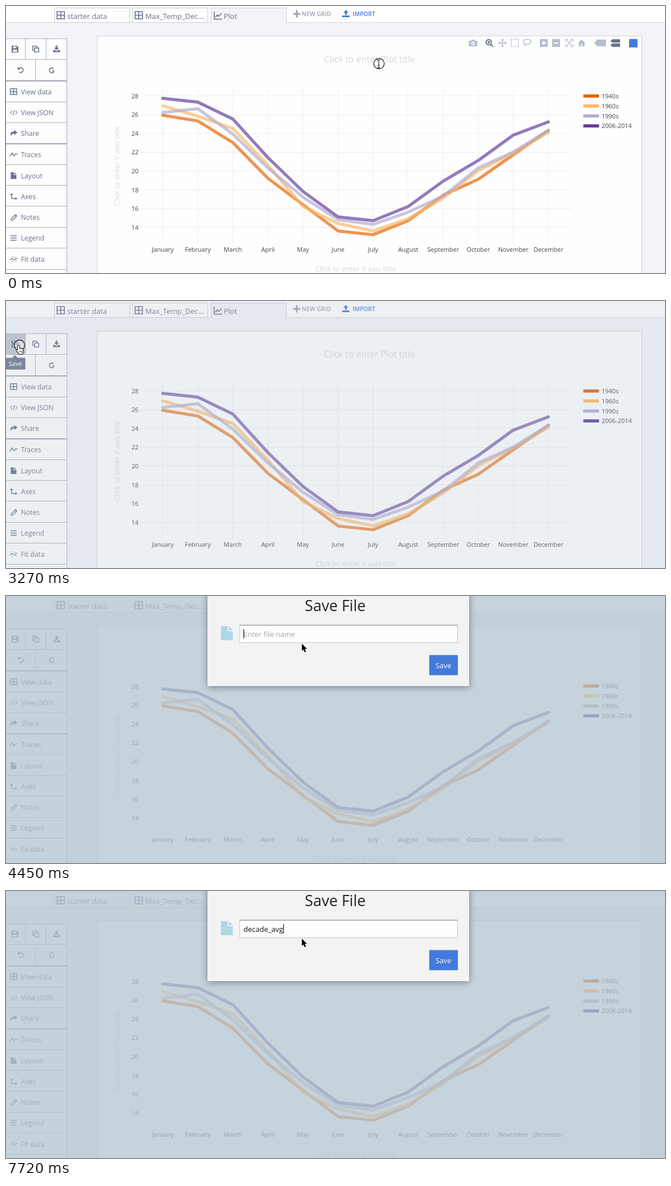
Recreate the animation shown at these times as an HTML page with a canvas. Size 1174x477 px, loop 8000 ms.

```html
<!DOCTYPE html>
<html lang="en">
<head>
<meta charset="utf-8">
<title>Saving a plot</title>
<style>
html, body { margin: 0; width: 100%; height: 100%; overflow: hidden; background: #f3f3f8; }
canvas { display: block; }
</style>
</head>
<body>
<canvas id="stage" width="1174" height="477"></canvas>
<script>
const ctx = document.getElementById('stage').getContext('2d');
const W = 1174, H = 477, LOOP = 8000;
const FONT = '"Open Sans", "Noto Sans", sans-serif';
const SLATE = '#69738a', PALE = '#b7bfcf', BLUE = '#447adb', EDGE = '#a9aebc';

// ---------- helpers ----------
function rect(x, y, w, h, fill) {
  ctx.fillStyle = fill;
  ctx.fillRect(x, y, w, h);
}

function frame(x, y, w, h, fill, stroke) {
  rect(x, y, w, h, fill);
  ctx.strokeStyle = stroke;
  ctx.lineWidth = 1;
  ctx.strokeRect(x + .5, y + .5, w - 1, h - 1);
}

function text(s, x, y, size, color, align = 'left', weight = 400) {
  ctx.font = `${weight} ${size}px ${FONT}`;
  ctx.textAlign = align;
  ctx.fillStyle = color;
  ctx.fillText(s, x, y);
}

function shape(d, x, y, { fill, stroke, width = 1.5, dash = [] }) {
  const path = new Path2D(d);
  ctx.save();
  ctx.translate(x, y);
  ctx.lineJoin = 'round';
  ctx.setLineDash(dash);
  if (stroke) {
    ctx.strokeStyle = stroke;
    ctx.lineWidth = width;
    ctx.stroke(path);
  }
  if (fill) {
    ctx.fillStyle = fill;
    ctx.fill(path, 'evenodd');
  }
  ctx.restore();
}

const solid = (d, x, y, color) => shape(d, x, y, { fill: color });
const line = (d, x, y, color, width, dash) => shape(d, x, y, { stroke: color, width, dash });
const passed = (t, times) => times.filter(v => t >= v).length;
const smooth = p => p * p * (3 - 2 * p);
const easeOut = p => 1 - Math.pow(1 - p, 2.2);

// ---------- page ----------
const GRID = 'M1 1H14V14H1ZM7.5 1V14M1 7.5H14';

function drawTabs() {
  rect(0, 0, W, 29, '#fff');
  rect(0, 29, W, 1, '#d3d4da');
  [[86, 'starter data'], [225, 'Max_Temp_Dec...']].forEach(([x, label]) => {
    frame(x, 3, 135, 27, '#fdfdfd', '#cbccd3');
    line(GRID, x + 4, 9, SLATE, 1.7);
    text(label, x + 23, 23, 13, SLATE);
  });
  frame(365, 3, 135, 28, '#f3f3f8', '#cbccd3');
  rect(366, 29, 133, 3, '#f3f3f8');
  line('M1 0V13.5H15M3 10L6.5 6 9 8.5 14 3', 370, 10, SLATE, 1.7);
  text('Plot', 388, 23, 13, SLATE);
  solid('M5 0H8V5H13V8H8V13H5V8H0V5H5Z', 511.5, 7.5, '#9ba3b4');
  text('NEW GRID', 527, 18, 10.5, '#9ba3b4', 'left', 600);
  solid('M6.5 0L11 5H8V9H5V5H2ZM0 10H13V13H0Z', 599, 7, BLUE);
  text('IMPORT', 617.5, 18, 10.5, BLUE, 'left', 600);
}

const MENU = [
  ['View data', 153, y => line('M.7 .7H12.3V11.3H.7ZM6.5 .7V11.3M.7 6H12.3', 7, y - 6, SLATE, 1.4)],
  ['View JSON', 190, y => line('M4 1L1 4.5 4 8M10 1L13 4.5 10 8M8 0L6 9', 7, y - 4, SLATE, 1.1)],
  ['Share', 227.5, y => solid('M7 0L13 4.5 7 9V6.3C4 6.3 2 7.5 2.2 11-1 7 0 2.7 7 2.7Z', 7.5, y - 6, SLATE)],
  ['Traces', 265.5, y => line('M0 8L4 2 7.5 7.5 10 3.5 13.5 4', 7, y - 5, SLATE, 1.4)],
  ['Layout', 303, y => solid('M0 0H5V5H10V12H0ZM6 0L10 4H6Z', 8.5, y - 6, SLATE)],
  ['Axes', 340, y => line('M3 1V9.5H12M1 3L3 1 5 3M10 7.5L12 9.5 10 11.5', 7, y - 5.5, SLATE, 1.4)],
  ['Notes', 377.5, y => line('M1 12L2 8.5 9 1.5 11.5 4 4.5 11ZM7.5 3L10 5.5', 8, y - 6.5, SLATE, 1.3)],
  ['Legend', 414.5, y => line('M0 1H11M0 5H11M0 9H11', 8, y - 5, SLATE, 1.6)],
  ['Fit data', 452, y => line('M0 7L4 4 8 6.5 13 3M3 1.2H4.6M8 2H9.6M4 9H5.6M10 8.5H11.6', 7, y - 5, SLATE, 1.3)]
];

function drawSidebar(hover) {
  rect(0, 58, 108, H - 58, '#fdfdfe');
  if (hover) rect(0, 58, 35, 37, '#c0c1cb');
  [58, 95, 171, 208, 283, 320, 357, 395, 432, 470].forEach(y => rect(0, y, 108, 1, EDGE));
  [133, 245.5].forEach(y => rect(0, y, 108, 1.5, '#7f879a'));
  [[34, 58, 37], [71, 58, 37], [52, 95, 38], [108, 58, H]].forEach(([x, y, h]) => rect(x, y, 1, h, EDGE));

  solid('M0 0H9.5L12 2.5V12H0ZM2.5 1.3V4.5H8.5V1.3ZM2.2 7V10.8H9.8V7Z', 10, 71, SLATE);
  line('M3.5 8H.7V.7H8V3.5M4 4H11.3V11.3H4Z', 47, 71, SLATE, 1.5);
  solid('M4.5 0H7.5V4H10.5L6 8.5 1.5 4H4.5ZM0 8H3L6 10.5 9 8H12V12H0Z', 84, 70.5, SLATE);
  line('M1.5 1V4.5H5M2 4.5A4.4 4.4 0 1 1 3.5 9.5', 20, 108.5, SLATE, 1.6);
  line('M9.5 3A4.4 4.4 0 1 0 9.5 9V6.5H6.5', 75.5, 109, SLATE, 1.6);

  MENU.forEach(([label, y, icon]) => {
    icon(y);
    text(label, 26.5, y + 4.5, 12.2, SLATE);
  });
}

function drawModebar(alpha) {
  if (alpha <= 0) return;
  ctx.save();
  ctx.globalAlpha = alpha;
  solid('M0 2H4L5 0H10L11 2H15V12H0ZM7.5 3.5A3.3 3.3 0 1 0 7.51 3.5ZM7.5 5.2A1.6 1.6 0 1 1 7.49 5.2Z', 824.5, 60, PALE);
  line('M6 1A4.8 4.8 0 1 0 6.01 1ZM9.5 9.3L14 13.8M3.6 5.8H8.4M6 3.4V8.2', 854, 59, SLATE, 2);
  line('M7.5 1V14M1 7.5H14M5.3 3L7.5 .8 9.7 3M5.3 12L7.5 14.2 9.7 12M3 5.3L.8 7.5 3 9.7M12 5.3L14.2 7.5 12 9.7', 877, 58.5, PALE, 1.5);
  line('M1 1H14V14H1Z', 899, 58.5, PALE, 1.8, [2, 1.7]);
  line('M4 9.5C-1 8 0 1 7.5 1S16 8 10 9.5C8 10 5 9 3.5 10S5 12 3.5 14', 921, 58.5, PALE, 1.5);
  solid('M0 0H14V14H0ZM6 3V6H3V8H6V11H8V8H11V6H8V3Z', 951, 59, PALE);
  solid('M0 0H14V14H0ZM3 6V8H11V6Z', 973, 59, PALE);
  line('M1 5V1H5M10 1H14V5M14 10V14H10M5 14H1V10M3 3L12 12M12 3L3 12', 996, 58.5, PALE, 1.4);
  solid('M7 0L14 7H12V13H8.5V9H5.5V13H2V7H0L7 0Z', 1018.5, 59.5, PALE);
  solid('M0 6L5 0H21V12H0L5 12Z', 1048, 60, PALE);
  solid('M0 3L3 0H17V6H3ZM0 10L3 7.5H17V13.5H3Z', 1077, 59.5, SLATE);
  rect(1110, 59, 15, 15, BLUE);
  ctx.restore();
}

// ---------- chart ----------
const MONTHS = 'January February March April May June July August September October November December'.split(' ');
const SERIES = [
  ['1940s', '#e66101', [25.9, 25.3, 23, 19.2, 16.4, 13.6, 13.2, 14.7, 17.4, 19.1, 21.7, 24.3]],
  ['1960s', '#fdb863', [26.9, 25.8, 24.5, 20.6, 16.2, 14.4, 13.6, 14.9, 17.1, 20, 21.9, 24.1]],
  ['1990s', '#b2abd2', [26.2, 26.6, 23.9, 20.3, 17.2, 14.8, 14.3, 15.6, 17.3, 20.3, 22, 24.3]],
  ['2006-2014', '#5e3c99', [27.7, 27.3, 25.5, 21.4, 17.8, 15.1, 14.7, 16.2, 18.9, 21.1, 23.8, 25.2]]
];
const px = i => 279.3 + i * 62.45;
const py = v => 160 + (28 - v) * 16.8;

function drawChart(shift) {
  frame(162, 53, 971, H - 40, '#fefefe', '#cfd0d6');
  text('Click to enter Plot title', 647.5, 100.5, 15.9, '#d9d9dc', 'center');
  text('Click to enter X axis title', 622.8, 474, 13, '#d9d9dc', 'center');
  ctx.save();
  ctx.translate(202, 286);
  ctx.rotate(-Math.PI / 2);
  text('Click to enter Y axis title', 0, 0, 13, '#d9d9dc', 'center');
  ctx.restore();

  MONTHS.forEach((name, i) => {
    if (!shift) rect(Math.round(px(i)) - .5, 148, 1, 277, '#eee');
    text(name, px(i), 438.5, 11, '#444', 'center');
  });
  for (let v = 14; v <= 28; v += 2) {
    if (!shift) rect(239, Math.round(py(v)), 769, 1, '#eee');
    text(v, 236, py(v) + 4.5 + shift, 11, '#444', 'right');
  }

  SERIES.forEach(([name, color, data], k) => {
    ctx.save();
    ctx.globalAlpha = .67;
    ctx.strokeStyle = color;
    ctx.lineWidth = 5.5;
    ctx.lineCap = ctx.lineJoin = 'round';
    ctx.beginPath();
    data.forEach((v, i) => ctx.lineTo(px(i), py(v) + shift));
    ctx.stroke();
    ctx.restore();
    const y = 160.8 + k * 17.8;
    rect(1028.5, y - 2.8, 28, 5.6, color);
    text(name, 1061, y + 4.2, 11, '#444');
  });
}

// ---------- dialog ----------
const KEYS = [4900, 5190, 5490, 5630, 6530, 6680, 7130, 7430, 7580, 7720];

function caretOn(t) {
  return !(t >= 4010 && t < 4450) && !(t >= 6230 && t < 6530);
}

function drawDialog(t) {
  if (t < 3560) return;
  ctx.save();
  if (t < 3710) {
    ctx.globalAlpha = .8;
    ctx.translate(0, -12);
  }
  ctx.save();
  ctx.shadowColor = 'rgba(0,0,0,.4)';
  ctx.shadowBlur = 12;
  ctx.shadowOffsetY = 2;
  rect(359, -20, 466, 181, '#f3f3f3');
  ctx.restore();
  text('Save File', 586.5, 26.5, 27, '#222', 'center');
  solid('M0 0H12V9H21V25H0ZM14 0L21 7H14Z', 383, 54, '#add8e6');
  frame(416, 52, 389, 32, '#fefefe', '#c4c4c4');
  rect(416, 51.5, 389, 1.2, '#999');

  const typed = 'decade_avg'.slice(0, passed(t, KEYS));
  if (typed) text(typed, 423, 73, 13, '#111');
  else text('Enter file name', 423, 73, 13, '#a5a5a5');
  if (t >= 3710 && caretOn(t)) {
    rect(Math.round(423 + (typed ? ctx.measureText(typed).width : 0)), 59, 1, 17, '#000');
  }
  rect(754, 105.5, 51, 36, BLUE);
  text('Save', 779.3, 128.5, 13, '#fff', 'center');
  ctx.restore();
}

function drawTooltip() {
  solid('M16 96.5L21 101.5H34.5V122.5H0V101.5H11Z', 0, 0, '#7c869b');
  text('Save', 4.5, 116, 11, '#fff');
}

// ---------- pointer ----------
const ARROW = 'M0 0V13.2L3 10.4 5.2 15.4 7.4 14.5 5.3 9.6H9.4Z';
const HAND = 'M3.2 1.8C3.2 .2 5.8 .2 5.8 1.8V6.4C6.2 5.4 8 5.6 8.1 6.7 8.6 5.9 10.2 6.2 10.3 7.3 10.9 6.6 12.2 7.1 12.2 8.3V11.5C12.2 13.1 11.2 13.9 11.2 15.7H5.2C5.2 14.2 2.6 12.3 .9 9.5 .1 8.1 1.7 7.5 2.6 8.5L3.2 9.5Z';
const MOVES = [
  { times: [1190, 1340, 1480], from: [664, 104], to: [321, 104], dip: 9, ease: smooth },
  { times: [1780, 1930, 2080, 2220, 2370], from: [321, 104], to: [22, 79], dip: 0, ease: easeOut },
  { times: [4010, 4160, 4300, 4450], from: [22, 79], to: [527, 85], dip: 0, ease: smooth }
];

function pointerAt(t) {
  const m = MOVES.filter(v => t >= v.times[0]).pop() || MOVES[0];
  const p = m.ease(passed(t, m.times) / m.times.length);
  const mix = i => m.from[i] + (m.to[i] - m.from[i]) * p;
  return [mix(0), mix(1) + m.dip * 4 * p * (1 - p)];
}

function ring(x, y) {
  ctx.beginPath();
  ctx.arc(x, y, 9.3, 0, 7);
  ctx.fillStyle = 'rgba(255,255,255,.4)';
  ctx.fill();
  ctx.strokeStyle = '#111';
  ctx.lineWidth = 1.2;
  ctx.stroke();
}

function drawPointer(t) {
  const [x, y] = pointerAt(t);
  if (t < 150) ring(664.5, 103);
  if (t >= 3270 && t < 3410) ring(24, 79);
  if (t < 1190) {
    line('M-3 -7.5Q0 -7.5 0 -5.5Q0 -7.5 3 -7.5M0 -6V6M-3 7.5Q0 7.5 0 5.5Q0 7.5 3 7.5M-1.5 2.5H1.5', 664, 103.5, '#111', 1.1);
  } else if (t >= 2220 && t < 3410) {
    shape(HAND, x - 4, y, { fill: '#fff', stroke: '#000', width: 2 });
    line('M6.3 10V13M8.3 10V13M10.2 10V13', x - 4, y, '#000', .7);
  } else {
    shape(ARROW, x, y, { fill: '#000', stroke: '#fff', width: 1.8 });
  }
}

// ---------- loop ----------
function draw(t) {
  rect(0, 0, W, H, '#f3f3f8');
  drawTabs();
  drawSidebar(t >= 2220 && t < 4010);
  drawChart(t >= 3410 ? 1 : 0);
  drawModebar(1 - passed(t, [2080, 2220]) / 2);
  if (t >= 3270) rect(0, 0, W, H, `rgba(179,196,209,${t < 3410 ? .23 : .75})`);
  if (t >= 2370 && t < 4010) drawTooltip();
  drawDialog(t);
  drawPointer(t);
}

const start = performance.now();
function tick() {
  draw((performance.now() - start) % LOOP);
  requestAnimationFrame(tick);
}
tick();
</script>
</body>
</html>
```
